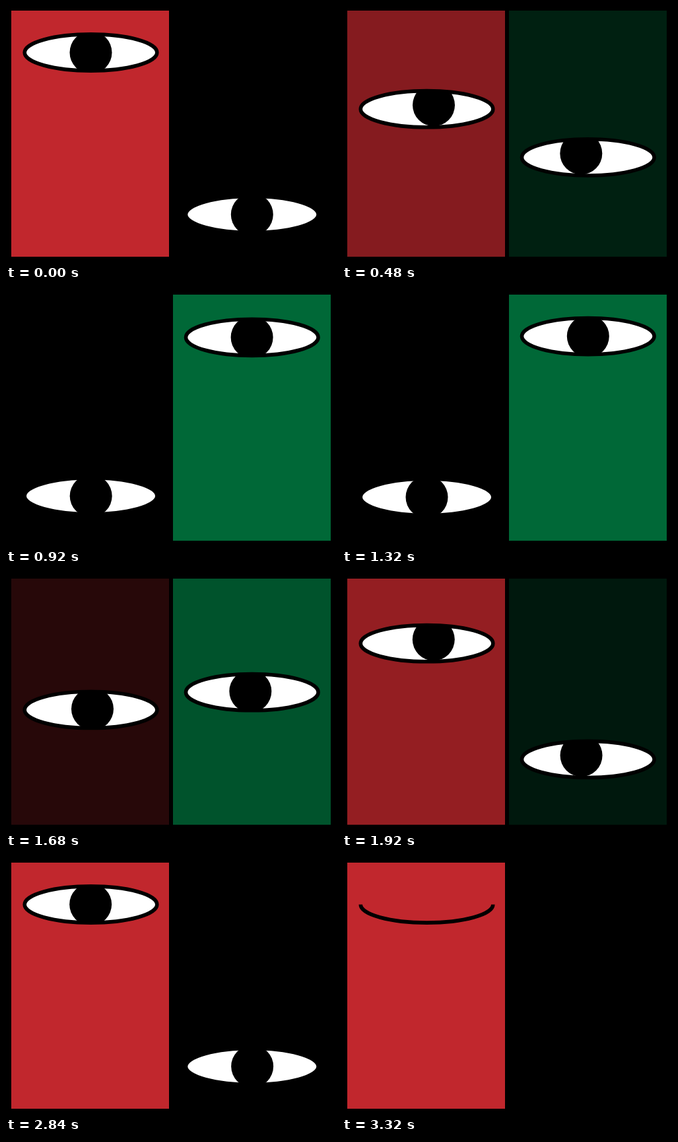
These frames come from a looping animation (500x388 px, 3360 ms). An HTML page with a canvas:

```html
<!DOCTYPE html>
<html lang="en">
<head>
<meta charset="utf-8">
<title>Two eyes</title>
<style>
  html, body { margin: 0; height: 100%; overflow: hidden; background: #000; }
  canvas { display: block; }
</style>
</head>
<body>
<canvas id="stage" width="500" height="388"></canvas>
<script>
const ctx = document.getElementById('stage').getContext('2d');
const LOOP = 3360, STEP = 40;
const RX = 100.3, RY = 27.6, PUPIL = 32;

const eyes = [
  { panelX: 8, x: 128.5, top: 70.5, bottom: 314, rgb: [193, 39, 45], inward: 1 },
  { panelX: 253, x: 372.8, top: 70, bottom: 316, rgb: [0, 104, 55], inward: -1 }
];

// Smooth 0..1 between two times
function ease(t, from, to) {
  const u = Math.min(1, Math.max(0, (t - from) / (to - from)));
  return u * u * (3 - 2 * u);
}

// Smooth out-and-back between two times
function bump(t, from, to) {
  return t > from && t < to ? Math.sin(Math.PI * (t - from) / (to - from)) ** 2 : 0;
}

// Upper lid: 1 is open, -1 lies on the lower lid
function lidAt(t) {
  for (const start of [1200, 3240]) {
    const n = (t - start) / STEP + 1;
    if (n >= 1 && n <= 3) return 1 - 2 * n / 3;
  }
  return 1;
}

function eyePath(x, y, lid) {
  ctx.beginPath();
  ctx.ellipse(x, y, RX, RY, 0, 0, Math.PI);
  if (lid > -1) {
    const down = lid < 0;
    ctx.ellipse(x, y, RX, RY * Math.abs(lid), 0, Math.PI, down ? 0 : 2 * Math.PI, down);
    ctx.closePath();
  }
}

function drawEye(eye, drop, light, lid, look) {
  const y = eye.top + (eye.bottom - eye.top) * drop;
  ctx.fillStyle = `rgb(${eye.rgb.map(c => Math.round(c * light))})`;
  ctx.fillRect(eye.panelX, 7, 239, 373);

  eyePath(eye.x, y, lid);
  if (lid > -1) {
    ctx.save();
    ctx.fillStyle = '#fff';
    ctx.fill();
    ctx.clip();
    ctx.beginPath();
    ctx.arc(eye.x + eye.inward * look.x, y + look.y, PUPIL, 0, 2 * Math.PI);
    ctx.fillStyle = '#000';
    ctx.fill();
    ctx.restore();
    eyePath(eye.x, y, lid);
  }
  ctx.strokeStyle = '#000';
  ctx.lineWidth = 5.6;
  ctx.stroke();
}

function draw(t) {
  const swap = ease(t, 160, 960) - ease(t, 1310, 2110);
  const fade = ease(t, 255, 860) - ease(t, 1505, 2110);
  const inLook = bump(t, 0, 960) + bump(t, 1580, 2200);
  const outLook = bump(t, 2200, 2880);
  const look = { x: 10.5 * (inLook - outLook), y: -6 * (inLook + outLook) };
  const lid = lidAt(t);

  ctx.fillStyle = '#000';
  ctx.fillRect(0, 0, 500, 388);
  drawEye(eyes[0], swap, 1 - fade, lid, look);
  drawEye(eyes[1], 1 - swap, fade, lid, look);
}

function frame() {
  draw(Math.floor(performance.now() % LOOP / STEP) * STEP);
  requestAnimationFrame(frame);
}
frame();
</script>
</body>
</html>
```
